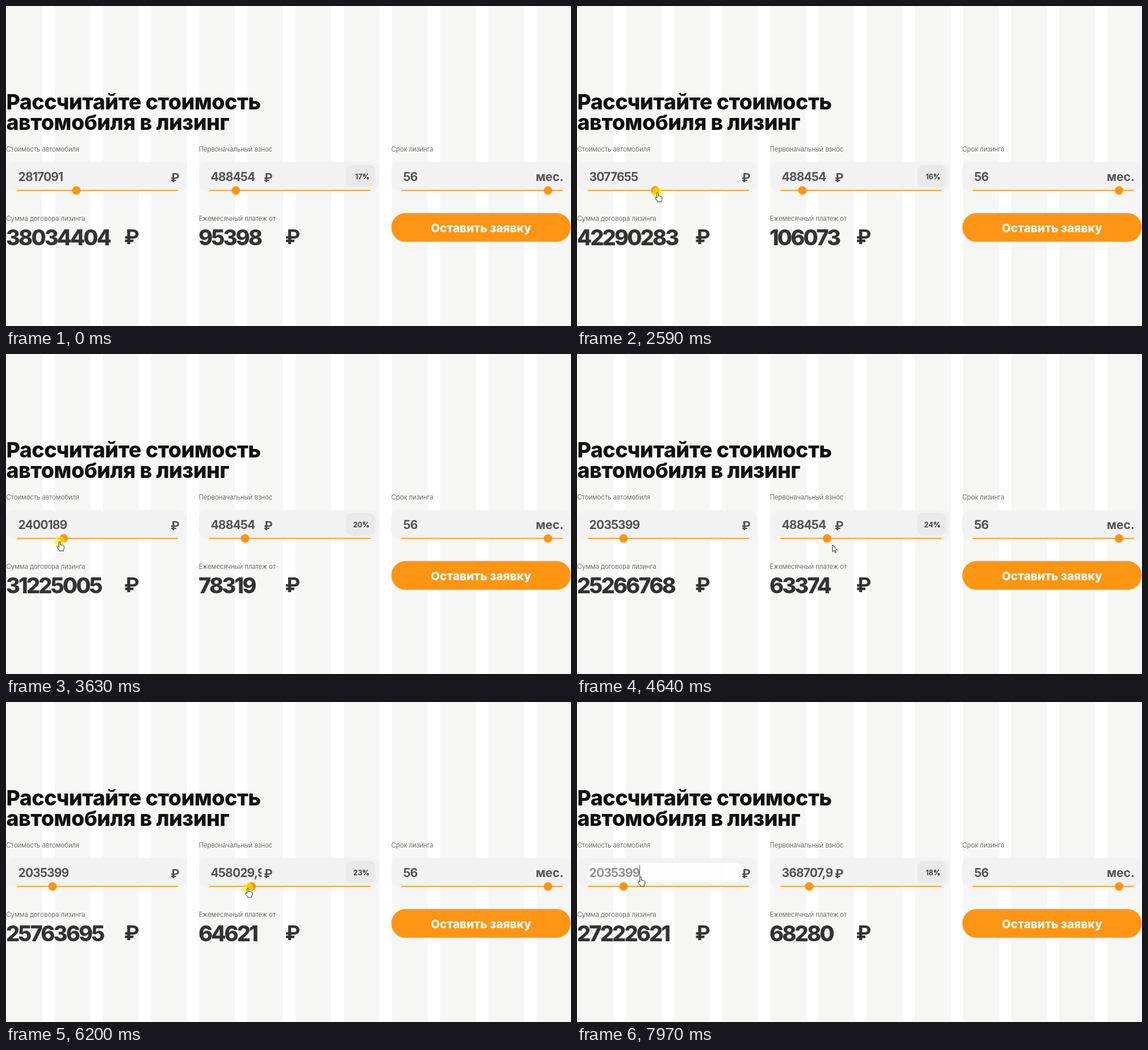
Recreate the animation shown at these times as an HTML page. Size 995 by 563 pixels, loop 8000 ms.

```html
<!DOCTYPE html>
<html lang="ru">
<head>
<meta charset="utf-8">
<title>Калькулятор лизинга</title>
<style>
html, body { margin: 0; width: 100%; height: 100%; overflow: hidden; background: #fff; }
svg { display: block; width: 100%; height: 100%; font-family: Inter, "DejaVu Sans", sans-serif; font-weight: 700; }
.title { font-size: 37.5px; font-weight: 800; letter-spacing: -.5px; fill: #111; }
.label { font-size: 11.4px; font-weight: 300; fill: #4a4a4a; }
.value { font-size: 21px; letter-spacing: -.85px; fill: #535353; }
.unit { font-size: 21px; fill: #535353; }
.total { font-size: 38px; font-weight: 800; letter-spacing: -2.9px; fill: #333; }
.ruble { font-size: 36px; fill: #333; }
.pct { font-size: 12.5px; fill: #444; }
.cta { font-size: 20.7px; font-weight: 800; fill: #fff; text-anchor: middle; }
.end { text-anchor: end; }
.box { fill: #f2f2f2; }
.accent { fill: #ff9514; }
.pointer { fill: #fff; stroke: #111; stroke-width: .9; stroke-linejoin: round; }
</style>
</head>
<body>
<svg viewBox="0 0 995 563">
  <defs>
    <pattern id="cols" x="1" width="84.85" height="563" patternUnits="userSpaceOnUse">
      <rect width="63" height="563" fill="#f6f6f5"/>
    </pattern>
    <clipPath id="field"><rect x="358" y="280" width="92.5" height="40"/></clipPath>
    <g id="input">
      <rect class="box" x="1" y="274.5" width="316" height="50.5" rx="14"/>
      <rect class="accent" x="19" y="323.5" width="284" height="1.8"/>
    </g>
  </defs>
  <rect width="995" height="563" fill="url(#cols)"/>

  <text class="title" x="0.5" y="182">Рассчитайте стоимость</text>
  <text class="title" x="0.5" y="218">автомобиля в лизинг</text>

  <g class="label">
    <text x="0.5" y="256">Стоимость автомобиля</text>
    <text x="339.5" y="256">Первоначальный взнос</text>
    <text x="678.5" y="256">Срок лизинга</text>
    <text x="0.5" y="377.5">Сумма договора лизинга</text>
    <text x="339.5" y="377.5">Ежемесячный платеж от</text>
  </g>

  <use href="#input"/>
  <use href="#input" x="339"/>
  <use href="#input" x="677.5"/>
  <rect x="599" y="279.5" width="51" height="40" rx="10" fill="#e9e9e9"/>

  <text class="unit" x="290" y="310">₽</text>
  <text class="value" x="21.5" y="308" id="price"></text>
  <g id="focus">
    <rect x="19" y="283" width="272" height="34" rx="12" fill="#fff"/>
    <text class="value" x="21.5" y="308" style="fill:#888">2035399</text>
    <path d="M110.5 287V309" stroke="#444"/>
  </g>
  <g clip-path="url(#field)"><text class="value" x="360.5" y="308" id="down"></text></g>
  <text class="unit" x="454" y="310">₽</text>
  <text class="pct end" x="627.5" y="305" id="pct"></text>
  <text class="pct" x="627.5" y="305" style="fill:#111">%</text>
  <text class="value" x="699.5" y="308">56</text>
  <text class="unit end" x="982" y="308">мес.</text>

  <g class="accent">
    <circle id="thumb1" cy="324.5" r="7.5"/>
    <circle id="thumb2" cy="324.5" r="7.5"/>
    <circle cx="954.5" cy="324.5" r="7.5"/>
    <rect x="678.5" y="364.3" width="316" height="50.5" rx="25.2"/>
  </g>
  <text class="cta" x="836.5" y="398">Оставить заявку</text>

  <text class="total" x="0" y="421" id="sum"></text>
  <text class="ruble" x="208" y="418.5">₽</text>
  <text class="total" x="339" y="421" id="monthly"></text>
  <text class="ruble" x="491.5" y="418.5">₽</text>

  <g id="cursor">
    <circle id="press" r="9.5" fill="#fff000" fill-opacity=".55"/>
    <path id="arrow" class="pointer" d="M0 0V12L2.8 9.4L4.7 13.7L6.5 12.9L4.6 8.8H8.4Z"/>
    <path id="hand" class="pointer" d="M-1.3 9.5V1.2a1.3 1.3 0 0 1 2.6 0V6.2c.6-.8 2.2-.6 2.4 .4c.7-.6 1.9-.3 2.1 .6c.9-.4 1.9 .1 1.9 1.2V11.5c0 1.6-.7 2.4-1 3.3V16.5H-.6V15C-2 13.5-3.2 11.6-4.3 9.7c-.7-1.3 .8-2.2 1.7-1.2Z"/>
  </g>
</svg>
<script>
const LOOP = 8000;
const LEAD = 80; // the thumbs lag this far behind the cursor
const $ = id => document.getElementById(id);

// Slider notches over time
const priceKeys = [[2320, 30], [2870, 50], [3140, 50], [3830, 0]];
const downKeys = [[5250, 43], [5430, 97], [5720, 123], [5920, 123], [6200, 32], [6480, 1], [6810, 0]];
// Cursor key points: time, x, y
const cursorKeys = [
  [640, 986, 543], [1110, 270, 323], [1380, 96, 329], [1450, 96, 329], [1790, 127, 325.5],
  [3140, 143, 330], [4160, 82, 330], [4640, 450, 336], [5050, 444, 326],
  [6200, 427, 327.5], [6810, 409, 326], [7350, 297, 309], [7970, 112, 307.5]
];

function at(keys, t, i = 1) {
  const n = keys.findIndex(k => t <= k[0]);
  if (n < 1) return keys.at(n)[i];
  const a = keys[n - 1], b = keys[n];
  return a[i] + (b[i] - a[i]) * (t - a[0]) / (b[0] - a[0]);
}

const within = (t, a, b) => t >= a && t < b;
const show = (id, on) => $(id).setAttribute('visibility', on ? 'inherit' : 'hidden');

const priceAt = t => Math.round(2035399 + 26056.4 * Math.round(at(priceKeys, t)));
const downAt = t => t < 5250 ? 488454 : Math.floor(368707 + 2791.32 * Math.round(at(downKeys, t))) + .9;
const shareAt = t => downAt(t) / priceAt(t);

// Sliders run from 1 to 6 million and from 10 to 60 percent
const thumb1At = t => 26.5 + 268 * (priceAt(t) - 1e6) / 5e6;
const thumb2At = t => 365.5 + 268 * (shareAt(t) - .1) / .5;

function draw(t) {
  const price = priceAt(t), down = downAt(t);
  const loan = price - down;

  $('price').textContent = price;
  $('down').textContent = String(down).replace('.', ',');
  $('pct').textContent = Math.round(shareAt(t) * 100);
  $('sum').textContent = Math.round(loan * 49 / 3);
  $('monthly').textContent = Math.round(loan * .04096735);
  $('thumb1').setAttribute('cx', thumb1At(t));
  $('thumb2').setAttribute('cx', thumb2At(t));

  const drag1 = within(t, 2320, 3830), drag2 = within(t, 5250, 6810);
  const x = drag1 ? thumb1At(t + LEAD) : drag2 ? thumb2At(t + LEAD) : at(cursorKeys, t);
  const y = at(cursorKeys, t, 2);
  const overField = y < 333 && x < 657;
  $('cursor').setAttribute('transform', `translate(${x} ${y})`);
  show('cursor', t >= 640);
  show('hand', overField);
  show('arrow', !overField);
  show('press', drag1 || drag2);

  const focus = .9 * Math.min(1, Math.max(0, (t - 7800) / 150));
  $('focus').setAttribute('opacity', focus);
  show('price', focus < .8);
}

const begin = performance.now();
function tick() {
  draw((performance.now() - begin) % LOOP);
  requestAnimationFrame(tick);
}
tick();
</script>
</body>
</html>
```
